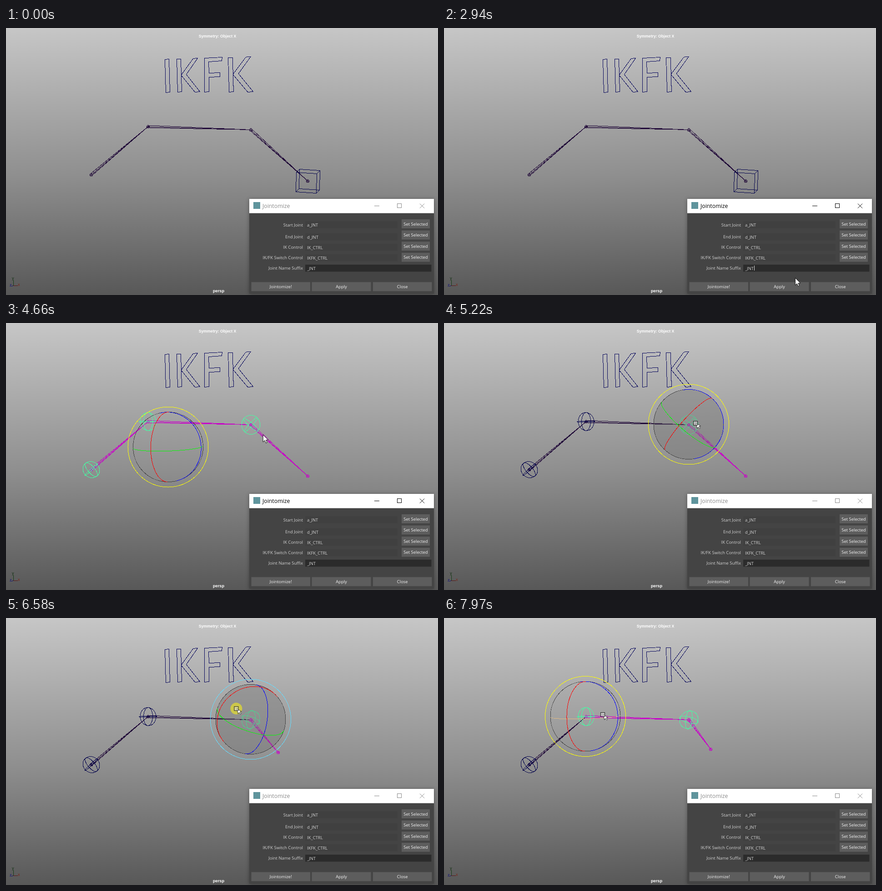
Animation of 950 by 589 pixels, one loop 7990 ms. Source, as an HTML page:

```html
<!DOCTYPE html>
<html lang="en">
<head>
<meta charset="utf-8">
<title>Rig switch demo</title>
<style>
  html, body { margin: 0; width: 100%; height: 100%; overflow: hidden; background: #888; }
  svg { display: block; width: 100vw; height: 100vh; }
  .ui { font: 9.45px "Open Sans", sans-serif; fill: #d0d0d0; filter: drop-shadow(0 1px 4px rgba(0, 0, 0, .35)); }
  .hud { font: bold 8.7px "Liberation Sans", Arial, sans-serif; fill: #fff; text-anchor: middle; }
  .axis { font: 9px "Liberation Sans", Arial, sans-serif; }
  .wire { fill: none; stroke-width: 1; shape-rendering: crispEdges; }
  .wire path { vector-effect: non-scaling-stroke; }
</style>
</head>
<body>
<svg viewBox="0 0 950 589" xmlns="http://www.w3.org/2000/svg">
  <defs>
    <linearGradient id="sky" x1="0" y1="0" x2="0" y2="1">
      <stop offset="0" stop-color="#c6c6c6"/>
      <stop offset=".55" stop-color="#8f8f8f"/>
      <stop offset="1" stop-color="#585858"/>
    </linearGradient>
  </defs>
  <rect width="950" height="589" fill="url(#sky)"/>
  <text class="hud" x="465" y="21">Symmetry: Object X</text>
  <text class="hud" x="467.5" y="583" style="font-size:9.2px">persp</text>
  <g class="axis">
    <path class="wire" d="M16 556V568" stroke="#123c12"/>
    <path class="wire" d="M16 568L26 569" stroke="#5a1818"/>
    <path class="wire" d="M16 568L12 570" stroke="#101070"/>
    <text x="13" y="555" fill="#123012">y</text>
    <text x="8" y="570" fill="#10107a">z</text>
    <text x="26" y="569" fill="#7a2418">x</text>
  </g>
  <g class="wire" stroke="#06065c" transform="translate(.5 .5)">
    <path d="M349 69L358 68L360 141L351 142Z"/>
    <path d="M436 66L475 64L474 72L445 74L446 99L470 98L470 107L446 108L446 140L436 141Z"/>
    <g transform="translate(375 141)">
      <path id="k" d="M0 -73H9L10 -38L36 -74L46 -75L21 -39L51 -1L40 0L10 -37L11 -1L2 0Z"/>
    </g>
    <use href="#k" transform="translate(488 141) scale(1.08 1.045)"/>
  </g>
  <g id="rig" class="wire" transform="translate(.5 .5)"></g>
  <g id="win" class="ui"></g>
  <g id="pointer">
    <circle id="press" r="13" fill="#dcd638" opacity=".8"/>
    <path id="arrow" d="M0 0V16L3.8 12.6L6.4 18.4L9 17.2L6.4 11.6H11.4Z" fill="#fff" stroke="#000" stroke-width=".9"/>
    <rect id="pick" x="-4.5" y="-4.5" width="9" height="9" fill="#ddd" fill-opacity=".5" stroke="#222"/>
  </g>
</svg>
<script>
const LOOP = 7990;
const NAVY = '#06064e', DARK = '#200838', CHILD = '#c800c8', LEAD = '#43ffa3';
const $ = id => document.getElementById(id);
const A = [187, 323], B = [312, 217], C = [538, 224], TIP = [663, 337];

// Event times (ms)
const FOCUS = 2450, CLICK = 3720, BUILT = 3870, PICK_C = 4850,
      DRAG = 5610, DROP = 6900, PICK_B = 7560, BLINK = 530;

const lerp = (a, b, u) => a.map((v, i) => v + (b[i] - v) * u);
const within = (t, a, b) => t >= a && t < b;
const ease = (t, a, b) => {
  const u = Math.min(1, Math.max(0, (t - a) / (b - a)));
  return u * u * (3 - 2 * u);
};

// Pointer moves: start, end, place reached
const moves = [
  [210, 1130, 795, 518], [1310, 1660, 773, 547], [2800, 3200, 771, 562],
  [4020, 4810, 544, 214], [4960, 5220, 553, 221], [DRAG, DROP, 498, 196],
  [DROP, 7210, 295, 207], [7220, 7430, 307, 204], [7580, 7970, 349, 213]
];
const mouseAt = t => moves.reduce((p, [a, b, ...to]) => lerp(p, to, ease(t, a, b)), [925, 590]);

// Orthonormal axes from a rough x and y; the third coordinate is depth
const dot = (a, b) => a.reduce((sum, v, i) => sum + v * b[i], 0);
const unit = v => v.map(c => c / Math.sqrt(dot(v, v)));
function axes(x, y) {
  x = unit(x);
  const along = dot(x, y);
  y = unit(y.map((v, i) => v - along * x[i]));
  return [x, y, [y[1] * x[2] - y[2] * x[1], y[2] * x[0] - y[0] * x[2], y[0] * x[1] - y[1] * x[0]]];
}
const axesA = axes([.7, -.6, .4], [-.6, -.75, .12]);
const axesB = axes([.87, .01, .5], [0, -1, .08]);
const axesMid = axes([.88, .02, .46], [0, -.99, .125]);

function wristPose(t) {
  const u = ease(t, DRAG, DROP);
  const [dx, dy] = lerp([125, 113], [48, 65], u);
  const depth = Math.sqrt(171 ** 2 - dx * dx - dy * dy);
  return {
    tip: [C[0] + dx, C[1] + dy],
    axes: axes([dx, dy, depth], lerp([.62, -.76, .2], [.24, -.91, .34], u))
  };
}

const place = (c, n) =>
  `transform="translate(${c}) rotate(${Math.atan2(n[1], n[0]) * 180 / Math.PI})"`;
const circle = (c, r, color, fill = 'none') =>
  `<circle cx="${c[0]}" cy="${c[1]}" r="${r}" stroke="${color}" fill="${fill}"/>`;
const path = (d, color) => `<path d="${d}" stroke="${color}"/>`;
const ring = (c, r, n, color) =>
  `<ellipse rx="${r * Math.abs(n[2])}" ry="${r}" ${place(c, n)} stroke="${color}"/>`;
const control = (c, r, frame, on) => frame.map(n => ring(c, r, n, on ? LEAD : NAVY)).join('');

// Half of a great circle nearest the viewer, widened a little by perspective
function frontArc(c, r, n, color) {
  const bulge = r * Math.min(1, Math.abs(n[2]) * 1.07);
  return `<path d="M0 ${-r}A${bulge} ${r} 0 0 0 0 ${r}" ${place(c, n)} stroke="${color}"/>`;
}

const joint = ([x, y], color) =>
  circle([x, y], 3, color) + path(`M${x - 3} ${y}h6M${x} ${y - 3}v6`, color);

function bone(s, e, on) {
  const color = on ? CHILD : DARK;
  const [dx, dy] = unit([e[0] - s[0], e[1] - s[1]]);
  const at = side => [s[0] + dx * 4 - dy * side, s[1] + dy * 4 + dx * side];
  return path(`M${s}L${at(-2.5)}L${e}L${at(2.5)}ZM${at(.5)}L${e}`, color) + joint(s, color);
}

function gizmo(c, frame, { outer = '#ff0', fill, green = '#0f0' }) {
  const [x, y, z] = frame;
  return circle(c, 77, '#404040', fill) + frontArc(c, 77, z, '#00f') +
    frontArc(c, 77, y, green) + frontArc(c, 77, x, '#f00') + circle(c, 88.5, outer);
}

function cube() {
  const back = [[645, 311], [690, 314], [689, 357], [644, 354]];
  const front = back.map(([x, y]) => [x - 7, y + 7]);
  return path(`M${back.join('L')}ZM${front.join('L')}Z` +
    back.map((p, i) => `M${p}L${front[i]}`).join(''), NAVY);
}

function drawRig(t) {
  const built = t >= BUILT;
  // Index of the first selected joint; everything below it lights up
  const first = !built ? 3 : t < PICK_C ? 0 : t < PICK_B ? 2 : 1;
  const wrist = wristPose(t);
  const chain = [A, B, C, built ? wrist.tip : TIP];
  const bones = [0, 1, 2].map(i => bone(chain[i], chain[i + 1], i >= first)).join('') +
    joint(chain[3], built ? CHILD : DARK);
  if (!built) return bones + cube();

  const controls = control(A, 19, axesA, first <= 0) + control(B, 20, axesB, first <= 1) +
    control(C, 21, wrist.axes, true);
  const handle = first === 0 ? gizmo([356, 273], axesMid, {})
    : first === 1 ? gizmo([310.5, 216.5], axesB, { green: '#e4bc80' })
    : gizmo([537.5, 223], wrist.axes, {
        outer: t < DRAG ? '#ff0' : '#64dcff',
        fill: t < DROP ? 'rgba(110,110,110,.35)' : 'none'
      });
  return bones + controls + handle;
}

const box = (x, y, w, h, fill) => `<rect x="${x}" y="${y}" width="${w}" height="${h}" fill="${fill}"/>`;
const label = (x, y, s, extra = '') => `<text x="${x}" y="${y}" ${extra}>${s}</text>`;
const button = (x, y, w, s, fill = '#5d5d5d') =>
  box(x, y, w, 20, fill) + label(x + w / 2, y + 13.6, s, 'text-anchor="middle" fill="#f2f2f2"');

const fields = {
  'Start Joint': 'a_JNT', 'End Joint': 'd_JNT', 'IK Control': 'IK_CTRL',
  'IK/FK Switch Control': 'IKFK_CTRL', 'Joint Name Suffix': '_JNT'
};

function drawWindow(active, apply, caret) {
  const ink = active ? '#000' : '#8a8a8a';
  let out = box(535, 377, 406, 209, '#444') + box(535, 377, 406, 31.5, '#fff') +
    box(544, 384, 15, 15, '#5f949c') +
    label(564, 397.3, 'Jointomize', `style="font-size:12.3px" fill="${ink}"`) +
    `<path class="wire" stroke="${ink}" d="M810 392.5H821M860.5 387.5h9v9h-9z"/>` +
    `<path fill="none" stroke="${ink}" d="M910 387.5l10 10m0-10l-10 10"/>`;
  Object.entries(fields).forEach(([name, value], i) => {
    const y = i ? 438 + 23 * i : 434.5;
    const editable = i === 4;
    out += box(658, y - 8, editable ? 277.5 : 203, 15.5, editable ? '#2b2b2b' : '#404040') +
      label(653, y + 3, name, 'text-anchor="end"') + label(662, y + 3.6, value);
    if (!editable) out += button(870, 422 + i * 24.6, 62, 'Set Selected');
  });
  if (caret) out += box(682, 524, 1, 11, '#ddd');
  return out + button(539.5, 560.5, 129.5, 'Jointomize!') +
    button(672.5, 560.5, 130, 'Apply', apply) + button(807, 560.5, 129.5, 'Close');
}

let lastWindow = '';
function render(t) {
  $('rig').innerHTML = drawRig(t);

  const [x, y] = mouseAt(t);
  const over = within(x, 673, 803) && within(y, 561, 581);
  const applyDown = within(t, CLICK, CLICK + 110);
  const apply = applyDown ? '#303030' : over ? '#707070' : '#5d5d5d';
  const caret = within(t, FOCUS, 4020) && Math.floor((t - FOCUS) / BLINK) % 2 === 0;
  const markup = drawWindow(within(t, FOCUS, PICK_C), apply, caret);
  if (markup !== lastWindow) $('win').innerHTML = lastWindow = markup;

  const pick = t > 4750;
  const down = applyDown || within(t, FOCUS, FOCUS + 110) || within(t, PICK_C - 20, PICK_C + 100) ||
    within(t, DRAG, DROP) || within(t, PICK_B - 120, PICK_B);
  $('pointer').setAttribute('transform', `translate(${x} ${y})`);
  $('pointer').style.display = t < 210 ? 'none' : '';
  $('arrow').setAttribute('transform', pick ? 'translate(1 0) rotate(-14) scale(.75)' : '');
  $('pick').style.display = pick ? '' : 'none';
  $('press').style.display = down ? '' : 'none';
}

const start = performance.now();
function tick() {
  render((performance.now() - start) % LOOP);
  requestAnimationFrame(tick);
}
tick();
</script>
</body>
</html>
```
